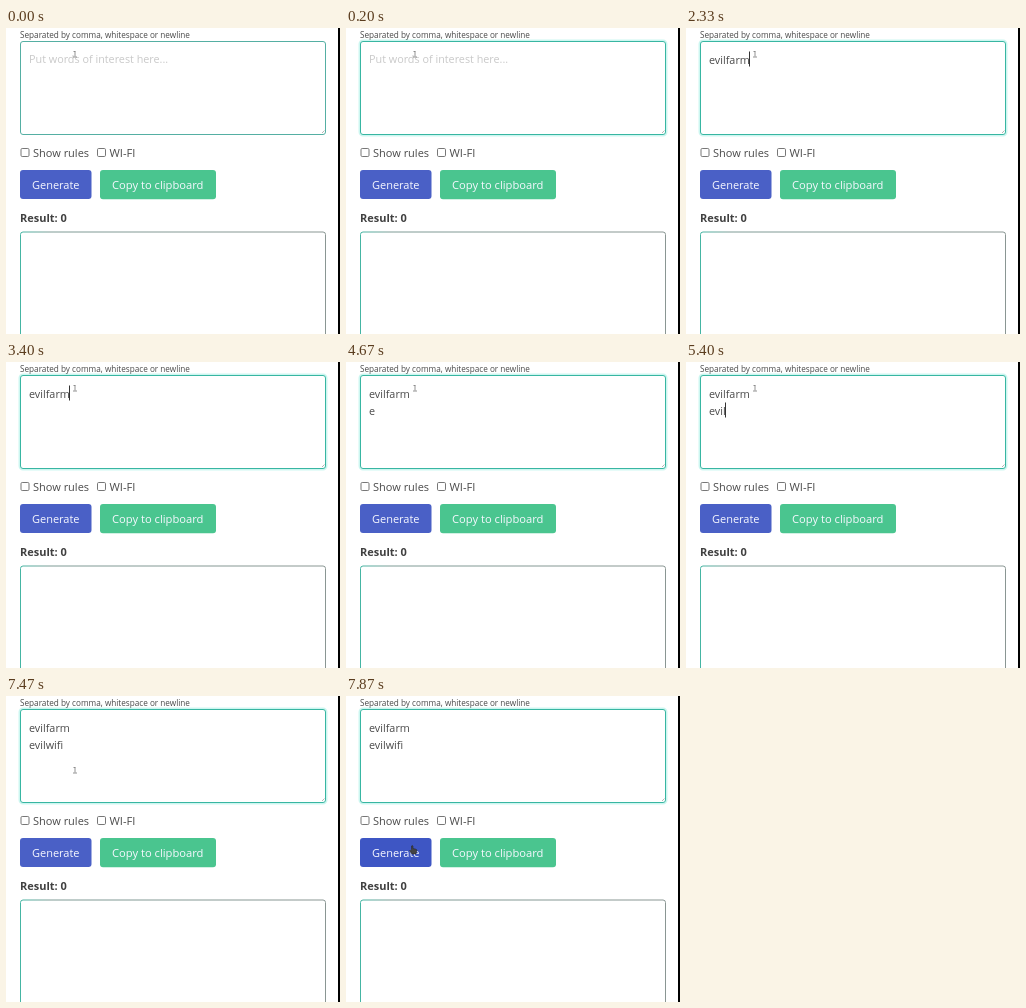
Recreate the animation shown at these times as an HTML page. Size 334 px wide and 306 px high, loop 8000 ms.

```html
<!DOCTYPE html>
<html lang="en">
<head>
<meta charset="utf-8">
<title>Word generator form</title>
<style>
  html, body { margin: 0; width: 100%; height: 100%; overflow: hidden; background: #fff; }
  svg { display: block; width: 334px; height: 306px; }
  text { font: 10.8px "Open Sans", "Noto Sans", sans-serif; fill: #4a4a4a; white-space: pre; }
  .help { font-size: 8.2px; }
  .hint { fill: #c9c9c9; }
  .label { font-size: 11px; }
  .button { font-size: 11px; fill: #f7f8ff; }
  .wide { font-size: 11.2px; }
  .result { font-size: 11px; font-weight: 700; fill: #404040; }
  .check { fill: #fff; stroke: #777; }
</style>
</head>
<body>
<svg viewBox="0 0 334 306">
  <defs>
    <linearGradient id="edge">
      <stop offset="0" stop-color="#45b5a3"/>
      <stop offset=".1" stop-color="#7d9a94"/>
      <stop offset="1" stop-color="#8a9693"/>
    </linearGradient>
  </defs>
  <text class="help" x="14" y="10">Separated by comma, whitespace or newline</text>

  <rect id="glow" x="13.5" y="12.5" width="307" height="95" rx="3.5" fill="none" stroke="#00d1b2" stroke-width="2"/>
  <rect id="field" x="14.5" y="13.5" width="305" height="93" rx="2.5" fill="#fff"/>
  <path d="M316 105l2.5-2.5" stroke="#999" stroke-width=".7"/>
  <text id="hint" class="hint" x="23" y="35.3">Put words of interest here...</text>
  <text id="line0" x="23" y="36"></text>
  <text id="line1" x="23" y="53"></text>
  <rect id="caret" width="1" height="15" fill="#333"/>

  <rect class="check" x="15" y="120.5" width="8" height="8" rx="1.2"/>
  <text class="label" x="27" y="129">Show rules</text>
  <rect class="check" x="91.5" y="120.5" width="8" height="8" rx="1.2"/>
  <text class="label wide" x="103.5" y="129">WI-FI</text>

  <rect id="generate" x="14" y="142" width="71.5" height="29" rx="3"/>
  <text class="button" x="26" y="161.3">Generate</text>
  <rect x="94" y="142" width="116" height="29.3" rx="3" fill="#4ac58f"/>
  <text class="button wide" x="106" y="161.3">Copy to clipboard</text>

  <text class="result" x="14" y="193.5">Result: 0</text>
  <rect x="14.5" y="204" width="305" height="120" rx="2.5" fill="#fff" stroke="url(#edge)"/>

  <path id="beam" d="M-1.5-3.5h2M0-3.5v5M-2 2h4" fill="none" stroke="#777" stroke-width=".8"/>
  <path id="hand" d="M-1.5-4q1-1 1.5 0v2.5l3 .7q1 .3.8 1.5l-.8 3.3h-4l-2.5-3.3 1-.6 1 .8z" fill="#444" stroke="#222" stroke-width=".5"/>
  <rect x="332" width="2" height="306" fill="#000"/>
</svg>
<script>
const LOOP = 8000;
const $ = id => document.getElementById(id);

// [start ms, typed text, caret shown]
const typing = [
  [0, "", 0], [1000, "e", 0], [1200, "ev", 1], [1400, "evi", 1], [1600, "evil", 1],
  [1800, "evilf", 1], [1870, "evilfa", 1], [2130, "evilfar", 1], [2330, "evilfarm", 1],
  [2800, "evilfarm", 0], [3400, "evilfarm", 1], [3530, "evilfarm\n", 0],
  [3870, "evilfarm\n", 1], [4400, "evilfarm\n", 0], [4670, "evilfarm\ne", 0],
  [5000, "evilfarm\nev", 1], [5200, "evilfarm\nevi", 1], [5400, "evilfarm\nevil", 1],
  [5600, "evilfarm\nevilw", 1], [6070, "evilfarm\nevilwi", 1],
  [6330, "evilfarm\nevilwif", 1], [6400, "evilfarm\nevilwifi", 0]
];
// [start ms, x, y]
const pointer = [[0, 69, 27], [7470, 69, 75], [7530, 68, 148], [7600, 67, 154]];
// [start ms, colour, glow opacity]
const border = [[0, "#55afa3", 0], [70, "#48b3a3", 0.08], [200, "#38b6a2", 0.2]];
const buttonColor = [[0, "#4a60c6"], [7600, "#445bc5"], [7800, "#3e56c4"]];

const at = (steps, t) => steps.findLast(step => step[0] <= t);
const show = (id, on) => $(id).setAttribute("visibility", on ? "visible" : "hidden");

function drawText(t) {
  const [, text, caretOn] = at(typing, t);
  const lines = text.split("\n");
  $("line0").textContent = lines[0];
  $("line1").textContent = lines[1] || "";
  show("hint", !text);
  show("caret", caretOn);
  const row = lines.length - 1;
  const width = lines[row] ? $("line" + row).getComputedTextLength() : 0;
  $("caret").setAttribute("x", Math.floor(22.5 + width));
  $("caret").setAttribute("y", 23.5 + 17 * row);
}

function drawPointer(t) {
  const [, x, y] = at(pointer, t);
  const overButton = y > 142;
  for (const id of ["beam", "hand"]) $(id).setAttribute("transform", `translate(${x} ${y})`);
  show("beam", !overButton);
  show("hand", overButton);
}

function draw(now) {
  const t = now % LOOP;
  const [, stroke, glow] = at(border, t);
  $("field").setAttribute("stroke", stroke);
  $("glow").setAttribute("opacity", glow);
  $("generate").setAttribute("fill", at(buttonColor, t)[1]);
  drawText(t);
  drawPointer(t);
}

const start = performance.now();
function frame() {
  draw(performance.now() - start);
  requestAnimationFrame(frame);
}
frame();
</script>
</body>
</html>
```
